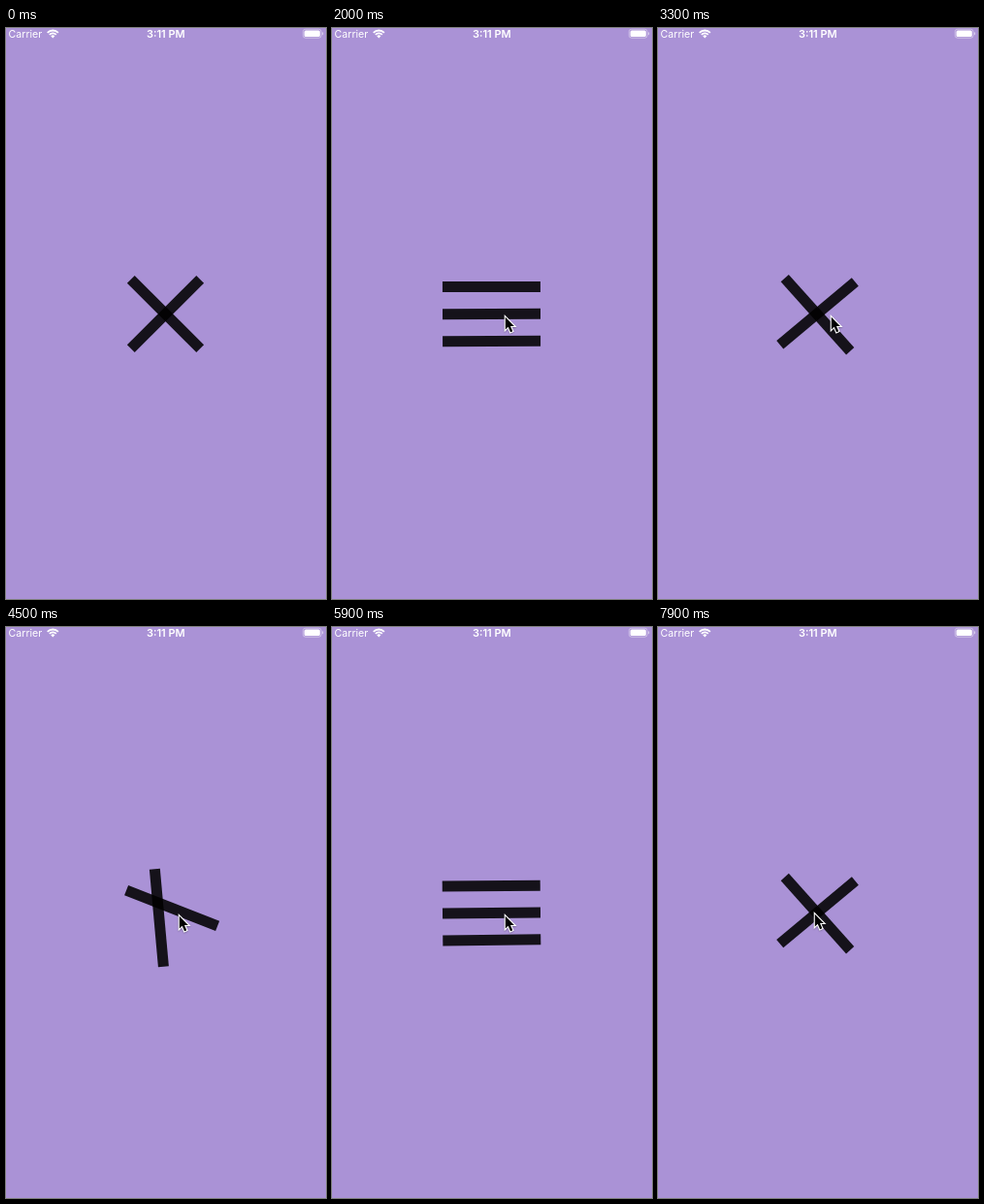
Animation, 330 px wide and 588 px high, one loop 8000 ms. Source, as an HTML page with a canvas:

```html
<!DOCTYPE html>
<html lang="en">
<head>
<meta charset="utf-8">
<title>Menu toggle</title>
<style>
  html, body { margin: 0; width: 100%; height: 100%; overflow: hidden; background: #aa92d6; }
  canvas { display: block; width: 100vw; height: 100vh; }
</style>
</head>
<body>
<canvas id="stage"></canvas>
<script>
const W = 330, H = 588, LOOP = 8000, STEP = 100;
const CX = 164.5, CY = 294.5, BAR_W = 101, BAR_H = 11, GAP = 28;
const FONT = 'Inter, Roboto, sans-serif';
const canvas = document.getElementById('stage');
const ctx = canvas.getContext('2d');

// Each toggle: start time and the state it moves to (0 = cross, 1 = menu)
const toggles = [[1038, 1], [2494, 0], [4300, 1], [5893, 0], [7861, 1]];

// Pointer keys: time, x, y
const pointerKeys = [
  [300, 237, 363], [400, 225, 349], [600, 203, 324], [800, 186, 304], [1000, 178, 296],
  [7100, 178, 296], [7200, 170, 295.5], [7300, 156, 295], [7400, 146, 295],
  [7500, 154, 294.5], [7600, 161, 294]
];

const bezier = (a, b, u) => 3 * (1 - u) * (1 - u) * u * a + 3 * (1 - u) * u * u * b + u * u * u;

function ease(x) {
  if (x <= 0) return 0;
  if (x >= 1) return 1;
  let lo = 0, hi = 1;
  for (let i = 0; i < 24; i++) {
    const mid = (lo + hi) / 2;
    if (bezier(0.25, 0.25, mid) < x) lo = mid; else hi = mid;
  }
  return bezier(0.1, 1, lo);
}

function menuAmount(t) {
  let p = 0;
  for (const [start, to] of toggles) {
    if (t >= start) p = to ? ease((t - start) / 1000) : 1 - ease((t - start) / 1000);
  }
  return p;
}

function pointerAt(t) {
  if (t < pointerKeys[0][0]) return null;
  const i = pointerKeys.findIndex(k => k[0] > t);
  if (i < 0) return pointerKeys[pointerKeys.length - 1].slice(1);
  const a = pointerKeys[i - 1], b = pointerKeys[i];
  const f = (t - a[0]) / (b[0] - a[0]);
  return [a[1] + (b[1] - a[1]) * f, a[2] + (b[2] - a[2]) * f];
}

function bar(offset, degrees, alpha) {
  ctx.save();
  ctx.translate(0, offset);
  ctx.rotate(degrees * Math.PI / 180);
  ctx.fillStyle = `rgba(0,0,0,${0.88 * alpha})`;
  ctx.fillRect(-BAR_W / 2, -BAR_H / 2, BAR_W, BAR_H);
  ctx.restore();
}

function drawIcon(p) {
  const tilt = 45 * (1 - p);
  ctx.save();
  ctx.translate(CX, CY);
  ctx.rotate(Math.PI * p);
  bar(-GAP * p, -tilt, 1);
  if (p > 0.5) bar(0, 0, 2 * p - 1);
  bar(GAP * p, tilt, 1);
  ctx.restore();
}

function drawPointer(x, y) {
  const shape = new Path2D('M0.8 1.8V14.6L3.7 11.8L6.1 17.2L8.3 16.2L6 11H9.9Z');
  ctx.save();
  ctx.translate(x, y);
  ctx.lineJoin = 'miter';
  ctx.strokeStyle = '#fff';
  ctx.lineWidth = 2.2;
  ctx.shadowColor = 'rgba(0,0,0,0.3)';
  ctx.shadowBlur = 1.5;
  ctx.shadowOffsetY = 0.8;
  ctx.stroke(shape);
  ctx.shadowColor = 'transparent';
  ctx.fillStyle = '#000';
  ctx.fill(shape);
  ctx.restore();
}

function roundRect(x, y, w, h, r) {
  ctx.beginPath();
  ctx.roundRect(x, y, w, h, r);
}

function drawStatusBar() {
  ctx.fillStyle = ctx.strokeStyle = '#fff';
  ctx.textBaseline = 'alphabetic';
  ctx.textAlign = 'left';
  ctx.font = `400 10.6px ${FONT}`;
  ctx.fillText('Carrier', 2.6, 10);
  ctx.textAlign = 'center';
  ctx.font = `600 11px ${FONT}`;
  ctx.fillText('3:11 PM', 164.8, 10);

  const from = -Math.PI * 0.75, to = -Math.PI * 0.25;
  ctx.lineWidth = 1.8;
  for (const r of [4.9, 7.9]) {
    ctx.beginPath();
    ctx.arc(48.3, 10.4, r, from, to);
    ctx.stroke();
  }
  ctx.beginPath();
  ctx.moveTo(48.3, 10.4);
  ctx.arc(48.3, 10.4, 2.9, from, to);
  ctx.fill();

  ctx.strokeStyle = 'rgba(255,255,255,0.45)';
  ctx.lineWidth = 0.9;
  roundRect(306.3, 1.2, 18.8, 9, 2.6);
  ctx.stroke();
  ctx.fillStyle = '#fff';
  roundRect(307.6, 2.5, 16.2, 6.4, 1.5);
  ctx.fill();
  ctx.fillStyle = 'rgba(255,255,255,0.5)';
  roundRect(326, 4.2, 1.2, 3, 0.6);
  ctx.fill();
}

function fit() {
  const ratio = window.devicePixelRatio || 1;
  const w = Math.round(innerWidth * ratio), h = Math.round(innerHeight * ratio);
  if (canvas.width !== w || canvas.height !== h) {
    canvas.width = w;
    canvas.height = h;
  }
  ctx.setTransform(w / W, 0, 0, h / H, 0, 0);
}

const begin = performance.now();

function draw() {
  const elapsed = (performance.now() - begin) % LOOP;
  const t = Math.floor(elapsed / STEP) * STEP;
  fit();
  ctx.fillStyle = '#aa92d6';
  ctx.fillRect(0, 0, W, H);
  drawStatusBar();
  drawIcon(menuAmount(t));
  const tip = pointerAt(t);
  if (tip) drawPointer(...tip);
  requestAnimationFrame(draw);
}
draw();
</script>
</body>
</html>
```
